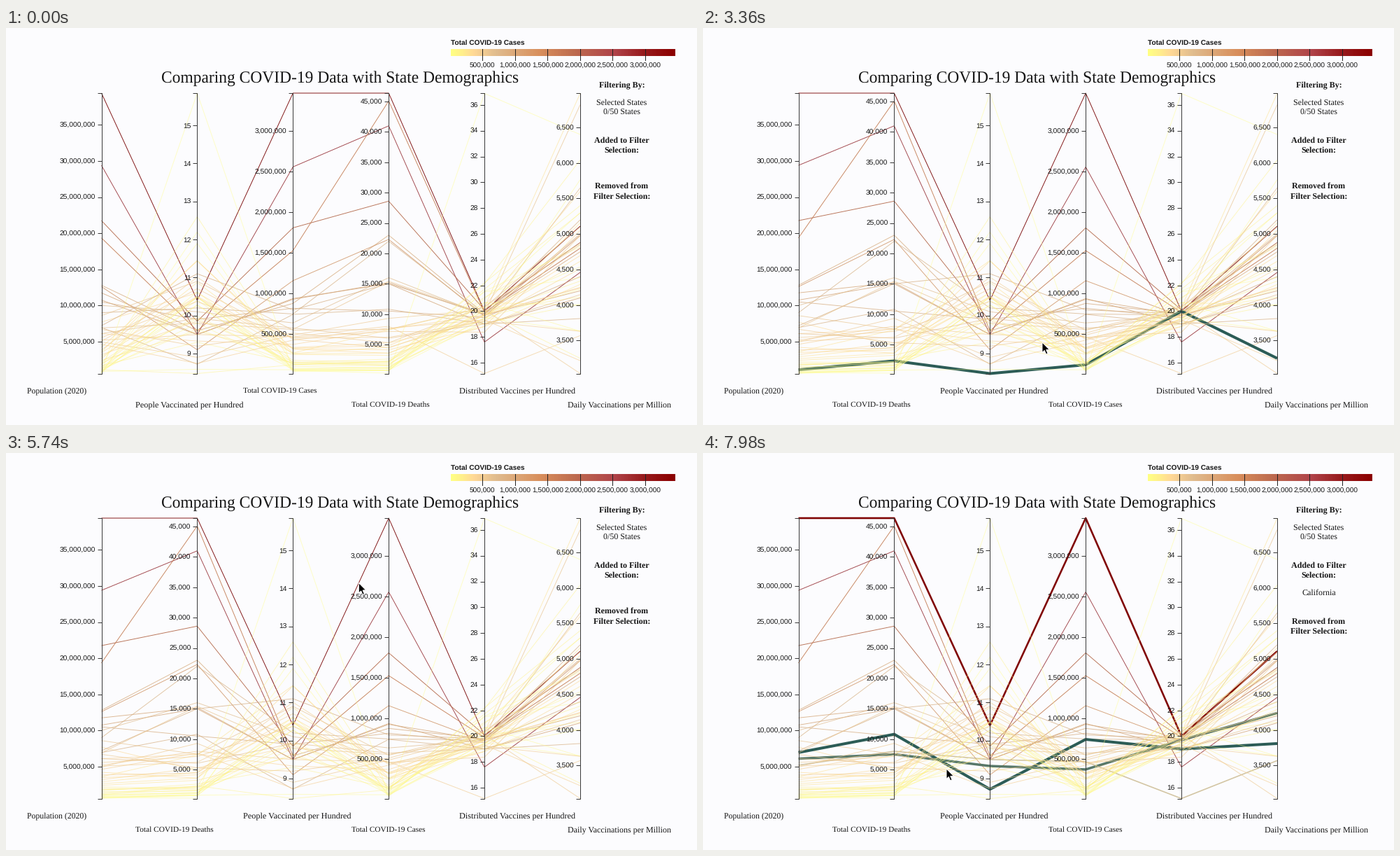
A matplotlib script that plays this animation: 988x567 px, repeating every 8000 ms.

```python
import numpy as np
import matplotlib.pyplot as plt
from matplotlib.animation import FuncAnimation
from matplotlib.collections import LineCollection
from matplotlib.colors import LinearSegmentedColormap, to_rgb
from matplotlib.patches import Polygon

plt.rcParams["text.hinting"] = "none"

W, H, DPI = 988, 567, 64
PT = 72 / DPI
STEP, FRAMES = 40, 200
TOP, BOTTOM = 93, 493.5
SERIF, SANS = "Liberation Serif", "Liberation Sans"
INK, TEAL = "#161616", np.array(to_rgb("#2c5c56"))

# label, text size, low, high, first tick, last tick, tick step, unit
DIMS = [
    ("Population (2020)", 11.7, 0.58, 39.4, 5, 35, 5, 1e6),
    ("People Vaccinated per Hundred", 12.2, 8.475, 15.85, 9, 15, 1, 1),
    ("Total COVID-19 Cases", 11.3, 0.017, 3.468, 0.5, 3, 0.5, 1e6),
    ("Total COVID-19 Deaths", 11.4, 0.215, 46.39, 5, 45, 5, 1e3),
    ("Distributed Vaccines per Hundred", 12.2, 15.16, 36.92, 16, 36, 2, 1),
    ("Daily Vaccinations per Million", 11.95, 3.036, 6.983, 3.5, 6.5, 0.5, 1e3),
]

STATES = {
    "CA": (39.4, 10.4, 3.468, 46.39, 20.0, 5.11),
    "TX": (29.4, 9.5, 2.56, 41.0, 17.6, 4.46),
    "FL": (21.75, 9.85, 1.81, 28.6, 20.1, 4.88),
    "NY": (19.35, 9.6, 1.53, 45.1, 19.9, 4.8),
    "PA": (12.8, 9.6, 0.88, 23.0, 19.8, 4.75),
    "IL": (12.6, 9.1, 1.16, 22.3, 19.6, 4.98),
    "OH": (11.75, 9.5, 0.93, 15.2, 19.7, 4.2),
    "GA": (10.75, 9.5, 0.94, 15.0, 19.0, 4.1),
    "NC": (10.5, 9.9, 0.82, 10.5, 19.5, 4.4),
    "MI": (10.0, 10.1, 0.64, 16.0, 19.7, 5.65),
    "NJ": (9.0, 10.2, 0.75, 22.0, 19.7, 5.2),
    "VA": (8.6, 10.9, 0.55, 7.5, 20.3, 5.1),
    "WA": (7.7, 10.6, 0.33, 4.8, 20.4, 5.6),
    "AZ": (7.2, 11.1, 0.8, 15.0, 19.8, 5.0),
    "TN": (6.95, 8.72, 0.745, 10.8, 19.0, 3.81),
    "MA": (6.9, 9.8, 0.56, 15.4, 19.8, 6.82),
    "MD": (6.1, 9.33, 0.375, 7.5, 19.7, 4.24),
    "SC": (5.2, 9.5, 0.47, 8.0, 15.16, 3.57),
    "AL": (4.95, 8.9, 0.49, 9.3, 20.1, 3.036),
    "CT": (3.6, 11.45, 0.27, 7.4, 20.3, 6.98),
    "RI": (1.1, 8.475, 0.125, 2.3, 20.0, 3.25),
    "WV": (1.8, 12.6, 0.13, 2.2, 22.2, 5.4),
    "AK": (0.73, 15.85, 0.055, 0.28, 36.9, 6.4),
}
NAMES = list(STATES)


def small_states(n):
    """Plausible rows for the remaining, less populous states."""
    rng = np.random.default_rng(11)
    pop = np.geomspace(0.6, 6.7, n)
    cases = pop * rng.uniform(0.065, 0.115, n)
    deaths = cases * rng.uniform(10, 18, n)
    vacc = rng.normal(10.0, 0.8, n)
    vacc[:2] = 12.2, 11.9
    dist = rng.normal(19.4 + 1.1 * (pop < 2), 0.8, n)
    daily = rng.normal(4.5, 0.6, n)
    rows = np.column_stack([pop, vacc, cases, deaths, dist, daily])
    return np.clip(rows, [d[2] for d in DIMS], [d[3] for d in DIMS])


def scale(k, v):
    lo, hi = DIMS[k][2:4]
    return BOTTOM - (np.asarray(v) - lo) / (hi - lo) * (BOTTOM - TOP)


def axis_x(slot):
    return 136.5 + 136.9 * slot


def label_x(slot):
    return 30 + 154.6 * slot


def ease(p):
    p = min(max(p, 0), 1)
    return 4 * p ** 3 if p < 0.5 else 1 - 4 * (1 - p) ** 3


# Cursor path: time, x, y
PATH = np.array([
    (0, 606, 600), (250, 600, 585), (700, 573, 536), (900, 573, 535),
    (2400, 308, 524), (2440, 301, 523), (2700, 301, 522), (3360, 485, 449),
    (4340, 526, 221), (5000, 517, 204), (5740, 504, 185), (6500, 504, 186),
    (6940, 503, 247), (7980, 345, 455),
])
GRAB, DROP, GRIP, SLIDE = 900, 2440, 80, 300
PASS_CASES, PASS_VACC = 1336, 2213
PICK = 6200

# state, hover start, hover end, peak
HOVERS = [
    ("RI", 3000, 3460, 1), ("CA", 5780, 6480, 1), ("MD", 7560, 7920, 1),
    ("TN", 7640, 9000, 1), ("SC", 7900, 9000, 0.3),
]


def cursor_at(t):
    return np.array([np.interp(t, PATH[:, 0], PATH[:, c]) for c in (1, 2)])


def slots_at(t):
    if t < PASS_CASES:
        return [0, 1, 2, 3, 4, 5]
    if t < PASS_VACC:
        return [0, 1, 3, 2, 4, 5]
    return [0, 2, 3, 1, 4, 5]


def label_at(k, t):
    row = 521 + 20 * (k % 2)
    if k == 1:
        e = ease((t - PASS_VACC) / SLIDE)
        return label_x(1 + e), row - 20 * e
    if k == 2:
        e = ease((t - PASS_CASES) / SLIDE)
        return label_x(2 + e), row + 20 * e
    if k == 3 and t > GRAB:
        x = cursor_at(min(t, DROP))[0] - GRIP
        return x + (label_x(1) - x) * ease((t - DROP) / SLIDE), row
    return label_x(k), row


fig = plt.figure(figsize=(W / DPI, H / DPI), dpi=DPI, facecolor="#fcfcfe")
ax = fig.add_axes([0, 0, 1, 1])
ax.axis("off")

CMAP = LinearSegmentedColormap.from_list("cases", [
    (0, "#ffff84"), (0.05, "#ffee8c"), (0.1, "#ffd896"), (0.2, "#e0bc8e"),
    (0.4, "#d88e5c"), (0.55, "#be6c50"), (0.73, "#b0444a"),
    (0.86, "#981c1e"), (1, "#8b0000")])


def text(x, y, s, size, font=SERIF, ha="left", weight="normal"):
    return ax.text(x, y, s, fontsize=size * PT, family=font, ha=ha,
                   weight=weight, color=INK, zorder=5)


# Legend
ax.imshow(np.linspace(0, 1, 321)[None], cmap=CMAP, aspect="auto",
          extent=(636, 957, 40, 30), zorder=1)
text(636, 24, "Total COVID-19 Cases", 10.1, SANS, weight="bold")
for i in range(1, 7):
    x = 634.6 + 46.55 * i
    ax.plot([x, x], [30, 46], color="#222222", lw=PT, zorder=2)
    text(x, 56.5, f"{i * 500000:,}", 10.1, SANS, "center")
ax.plot([0, W], [566.5, 566.5], color="#a9a994", lw=PT)

text(222, 78, "Comparing COVID-19 Data with State Demographics", 23.55)

# Filter panel
MID = 880.5
for y, s, weight in [(84, "Filtering By:", "bold"),
                     (109.5, "Selected States", "normal"),
                     (124, "0/50 States", "normal"),
                     (164, "Added to Filter", "bold"),
                     (178, "Selection:", "bold")]:
    text(MID, y, s, 12, ha="center", weight=weight)
picked = text(MID, 203, "California", 12, ha="center")
removed = [text(MID, 0, s, 12, ha="center", weight="bold")
           for s in ("Removed from", "Filter Selection:")]

# Data lines: pale for few cases, darker for many
data = np.vstack([list(STATES.values()), small_states(50 - len(STATES))])
ys = np.column_stack([scale(k, data[:, k]) for k in range(6)])
heat = (data[:, 2] - DIMS[2][2]) / (DIMS[2][3] - DIMS[2][2])
base = CMAP(heat)
base[:, :3] *= 1 - 0.15 * heat[:, None]
base[:, 3] = np.clip(0.38 + 0.8 * np.sqrt(heat), 0, 0.92)
lines = LineCollection([], zorder=3)
ax.add_collection(lines)

# Axes
ticks, tick_text, labels = [], [], []
for k, (name, size, lo, hi, first, last, step, unit) in enumerate(DIMS):
    vals = np.arange(first, last + step / 2, step)
    ticks.append(scale(k, vals))
    tick_text.append([text(0, y + 3.6, f"{round(v * unit):,}", 10.2, SANS, "right")
                      for v, y in zip(vals, ticks[k])])
    labels.append(text(0, 0, name, size))
frame_lines = LineCollection([], colors="#3a3a3a", linewidths=PT, zorder=4)
ax.add_collection(frame_lines)

ARROW = np.array([(0, 0), (0, 14.5), (3.3, 11.4), (5.6, 16.8), (8, 15.8),
                  (5.7, 10.5), (10.2, 10.3)])
arrow = Polygon(ARROW, closed=True, fc="black", ec="white", lw=0.9 * PT, zorder=9)
ax.add_patch(arrow)
ax.set_xlim(0, W)
ax.set_ylim(H, 0)


def place_axes(slots):
    segs = []
    for k, slot in enumerate(slots):
        x = axis_x(slot)
        segs.append([(x - 6, TOP), (x, TOP), (x, BOTTOM), (x - 6, BOTTOM)])
        segs += [[(x - 6, y), (x, y)] for y in ticks[k]]
        for label in tick_text[k]:
            label.set_x(x - 9)
    frame_lines.set_segments(segs)


def style_lines(t):
    colors = base.copy()
    widths = np.full(len(data), 0.95)
    if t >= PICK:
        colors[0], widths[0] = (0.5, 0.01, 0.01, 1), 2.6
    for name, start, end, peak in HOVERS:
        s = peak * np.interp(t, [start, start + 80, end, end + 240], [0, 1, 1, 0])
        i = NAMES.index(name)
        colors[i, :3] += (TEAL - colors[i, :3]) * s
        colors[i, 3] += (1 - colors[i, 3]) * s
        widths[i] += (4 - widths[i]) * s
    lines.set_color(colors)
    lines.set_linewidth(widths * PT)


def draw(i):
    t = i * STEP
    slots = slots_at(t)
    order = np.argsort(slots)
    xs = axis_x(np.arange(6))
    lines.set_segments([np.column_stack([xs, row[order]]) for row in ys])
    style_lines(t)
    place_axes(slots)
    for k, label in enumerate(labels):
        label.set_position(label_at(k, t))
    arrow.set_xy(ARROW + cursor_at(t))
    on = t >= PICK
    picked.set_visible(on)
    for n, line in enumerate(removed):
        line.set_y(229 + 14.4 * n + 14.4 * on)
    return []


anim = FuncAnimation(fig, draw, frames=FRAMES, interval=STEP, repeat=True,
                     repeat_delay=0, init_func=lambda: draw(0))
plt.show()
```
